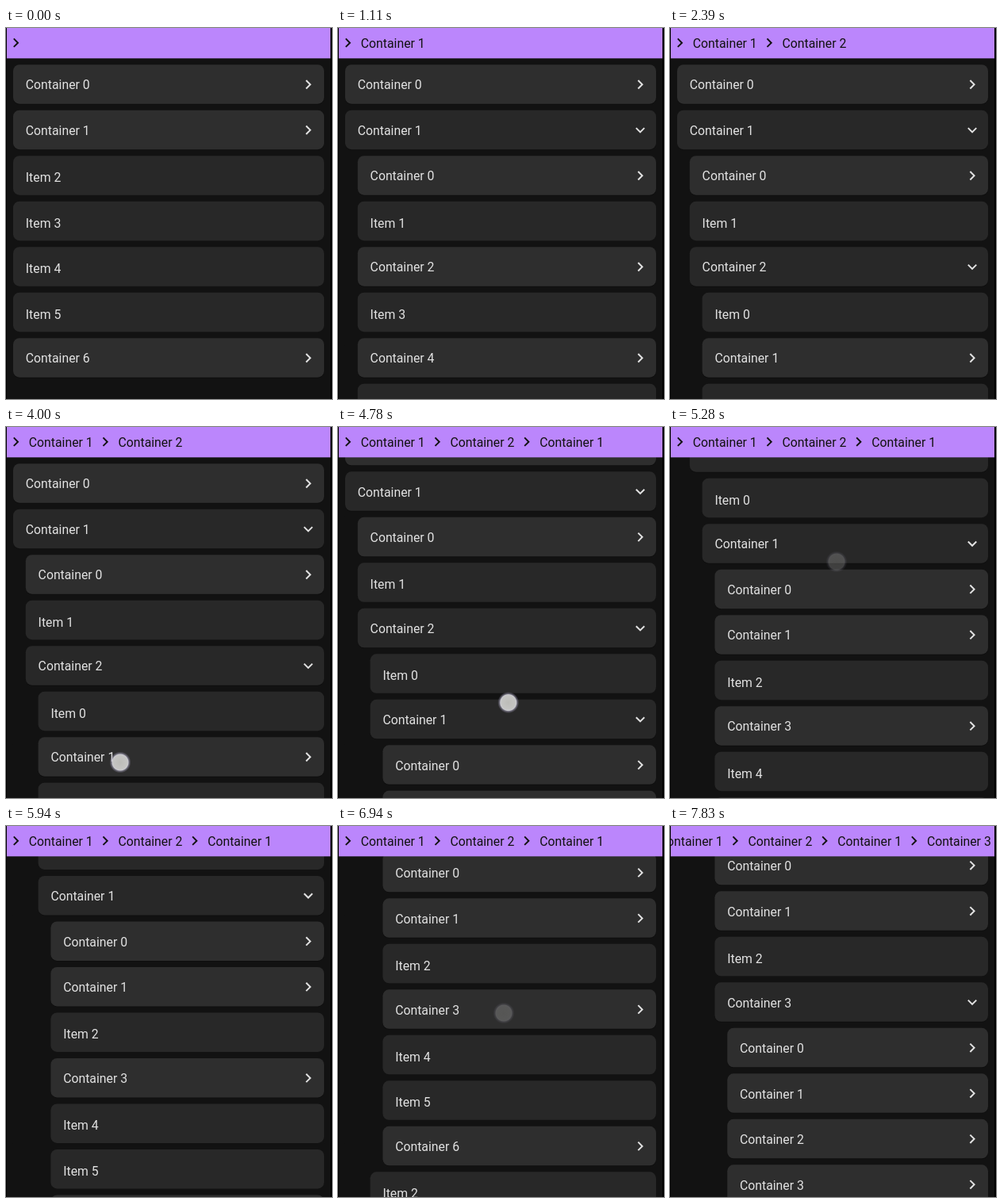
These frames come from a looping animation (411 px wide and 468 px high, 8000 ms). An HTML page:

```html
<!DOCTYPE html>
<html lang="en">
<head>
<meta charset="utf-8">
<title>Nested list</title>
<style>
html, body { margin: 0; width: 100%; height: 100%; overflow: hidden; background: #000; }
svg { display: block; width: 411px; height: 468px; }
text { font: 15.8px Roboto, sans-serif; white-space: pre; }
</style>
</head>
<body>
<svg id="stage" viewBox="0 0 411 468">
  <defs>
    <radialGradient id="glow">
      <stop offset="0" stop-color="#bcbcb8"/>
      <stop offset=".62" stop-color="#c4c4c2"/>
      <stop offset=".74" stop-color="#d2d2d6" stop-opacity=".95"/>
      <stop offset=".82" stop-color="#b4b0c8" stop-opacity=".5"/>
      <stop offset="1" stop-color="#9c96b8" stop-opacity="0"/>
    </radialGradient>
    <clipPath id="screen"><rect x="1" width="408" height="468"/></clipPath>
  </defs>
  <rect width="411" height="468"/>
  <g clip-path="url(#screen)">
    <rect x="1" width="408" height="468" fill="#121212"/>
    <g id="list" fill="#e2e2e2"></g>
    <rect x="1" width="408" height="38.3" fill="#bb86fc"/>
    <g id="crumbs" fill="#121212"></g>
    <circle id="touch" r="13.5" fill="url(#glow)"/>
  </g>
</svg>
<script>
const LOOP = 8000, PITCH = 57.5, TOP = 46.2, INDENT = 15.8, ICON = 0.987;
const RIGHT = 'M8.59 16.59 13.17 12 8.59 7.41 10 6l6 6-6 6z';
const DOWN = 'M16.59 8.59 12 13.17 7.41 8.59 6 10l6 6 6-6z';

// C is a container, I an item; open is the child that gets expanded.
const levels = [
  { kinds: 'CCIIIIC', open: 1, start: 990, end: 1100 },
  { kinds: 'CICICII', open: 2, start: 2220, end: 2370 },
  { kinds: 'ICIIICI', open: 1, start: 4120, end: 4270 },
  { kinds: 'CCICIIC', open: 3, start: 7580, end: 7760 },
  { kinds: 'CCCCICI', open: -1 }
];

// Points of [time, value].
const scrollKeys = [[4670, 0], [4730, 14], [4840, 86], [5000, 209], [5100, 238],
  [5280, 269], [5440, 278], [5500, 278], [5600, 294], [5740, 317], [5940, 328.3],
  [6670, 328.3], [6730, 344], [6830, 390], [6920, 413], [7000, 420],
  [7170, 420], [7280, 423.9]];

const touches = [
  { from: 890, to: 980, fade: 90, x: 150, y: 134 },
  { from: 2110, to: 2210, fade: 120, x: 146, y: 307 },
  { from: 4000, to: 4100, fade: 130, x: 144, y: 423 },
  { from: 4670, to: 5170, fade: 150, x: 216, y: 395, endX: 210, endY: 170, drag: 0 },
  { from: 5500, to: 5700, fade: 140, x: 212, y: 230, endX: 211, endY: 196, drag: 278 },
  { from: 6670, to: 6840, fade: 140, x: 212, y: 300, endX: 209, endY: 236, drag: 328.3 },
  { from: 7440, to: 7550, fade: 140, x: 148, y: 226 }
];

const $ = id => document.getElementById(id);
const clamp = v => Math.max(0, Math.min(1, v));
const progress = (t, a, b) => clamp((t - a) / (b - a));
const easeOut = p => 1 - (1 - p) ** 2;

function make(parent, tag, attrs, label) {
  const node = document.createElementNS('http://www.w3.org/2000/svg', tag);
  for (const key in attrs) node.setAttribute(key, attrs[key]);
  if (label) node.textContent = label;
  return parent.appendChild(node);
}

function sample(keys, t) {
  const i = keys.findIndex(k => k[0] > t);
  if (i === 0) return keys[0][1];
  if (i < 0) return keys[keys.length - 1][1];
  const [a, from] = keys[i - 1], [b, to] = keys[i];
  return from + (to - from) * progress(t, a, b);
}

function makeRow(depth, index, kind) {
  const x = 9 + depth * INDENT, box = kind === 'C';
  const g = make($('list'), 'g', {});
  const size = { x, width: 401 - x, height: 49.5, rx: 8 };
  if (box) make(g, 'rect', { ...size, y: 1, fill: '#000', opacity: .25 });
  const card = make(g, 'rect', { ...size, fill: box ? '#2e2e2e' : '#282828' });
  make(g, 'text', { x: x + 15.8, y: box ? 31.3 : 33 }, (box ? 'Container ' : 'Item ') + index);
  const icon = box && make(g, 'path', { d: RIGHT, transform: `translate(369.2 13.2) scale(${ICON})` });
  return { g, card, icon };
}

function build(depth) {
  const level = levels[depth];
  level.rows = [...level.kinds].map((kind, i) => {
    if (i === level.open + 1 && level.open >= 0) build(depth + 1);
    return makeRow(depth, i, kind);
  });
}
build(0);

const crumbIcon = x => ({ d: RIGHT, transform: `translate(${x} 6.8) scale(${ICON})` });
make($('crumbs'), 'path', crumbIcon(.6));
const crumbs = levels.slice(0, 4).map((level, i) => {
  const g = make($('crumbs'), 'g', {}), x = 28.8 + i * 112.7;
  if (i) make(g, 'path', crumbIcon(x - 28.2));
  make(g, 'text', { x, y: 25 }, 'Container ' + level.open);
  return g;
});

const growth = (level, t) => level.open < 0 ? 0 : easeOut(progress(t, level.start, level.end));

function height(depth, t) {
  const level = levels[depth], p = growth(level, t);
  return level.rows.length * PITCH + (p ? p * height(depth + 1, t) : 0);
}

function layout(depth, top, alpha, t) {
  const level = levels[depth], p = growth(level, t);
  let y = top;
  level.rows.forEach((row, i) => {
    row.g.setAttribute('transform', `translate(0 ${y.toFixed(2)})`);
    row.g.setAttribute('opacity', alpha);
    row.g.setAttribute('display', alpha && y > -60 && y < 470 ? 'inline' : 'none');
    y += PITCH;
    if (i !== level.open) return;
    row.card.setAttribute('fill', p ? '#282828' : '#2e2e2e');
    row.icon.setAttribute('d', p ? DOWN : RIGHT);
    layout(depth + 1, y, alpha * p, t);
    if (p) y += p * height(depth + 1, t);
  });
}

function drawTouch(t, scroll) {
  const touch = touches.find(k => t >= k.from && t < k.to + k.fade);
  $('touch').setAttribute('display', touch ? 'inline' : 'none');
  if (!touch) return;
  let { x, y } = touch;
  if ('drag' in touch) {
    const full = y - touch.endY;
    y = Math.max(touch.endY, y - (scroll - touch.drag));
    x += (touch.endX - x) * (touch.y - y) / full;
  }
  $('touch').setAttribute('cx', x);
  $('touch').setAttribute('cy', y);
  $('touch').setAttribute('opacity', 1 - progress(t, touch.to, touch.to + touch.fade));
}

function draw(t) {
  const scroll = sample(scrollKeys, t);
  layout(0, TOP - scroll, 1, t);
  crumbs.forEach((g, i) => g.setAttribute('display', t >= levels[i].start ? 'inline' : 'none'));
  const shift = -43 * easeOut(progress(t, 7600, 7820));
  $('crumbs').setAttribute('transform', `translate(${shift} 0)`);
  drawTouch(t, scroll);
}

const begin = performance.now();
function tick() {
  draw((performance.now() - begin) % LOOP);
  requestAnimationFrame(tick);
}
tick();
</script>
</body>
</html>
```
